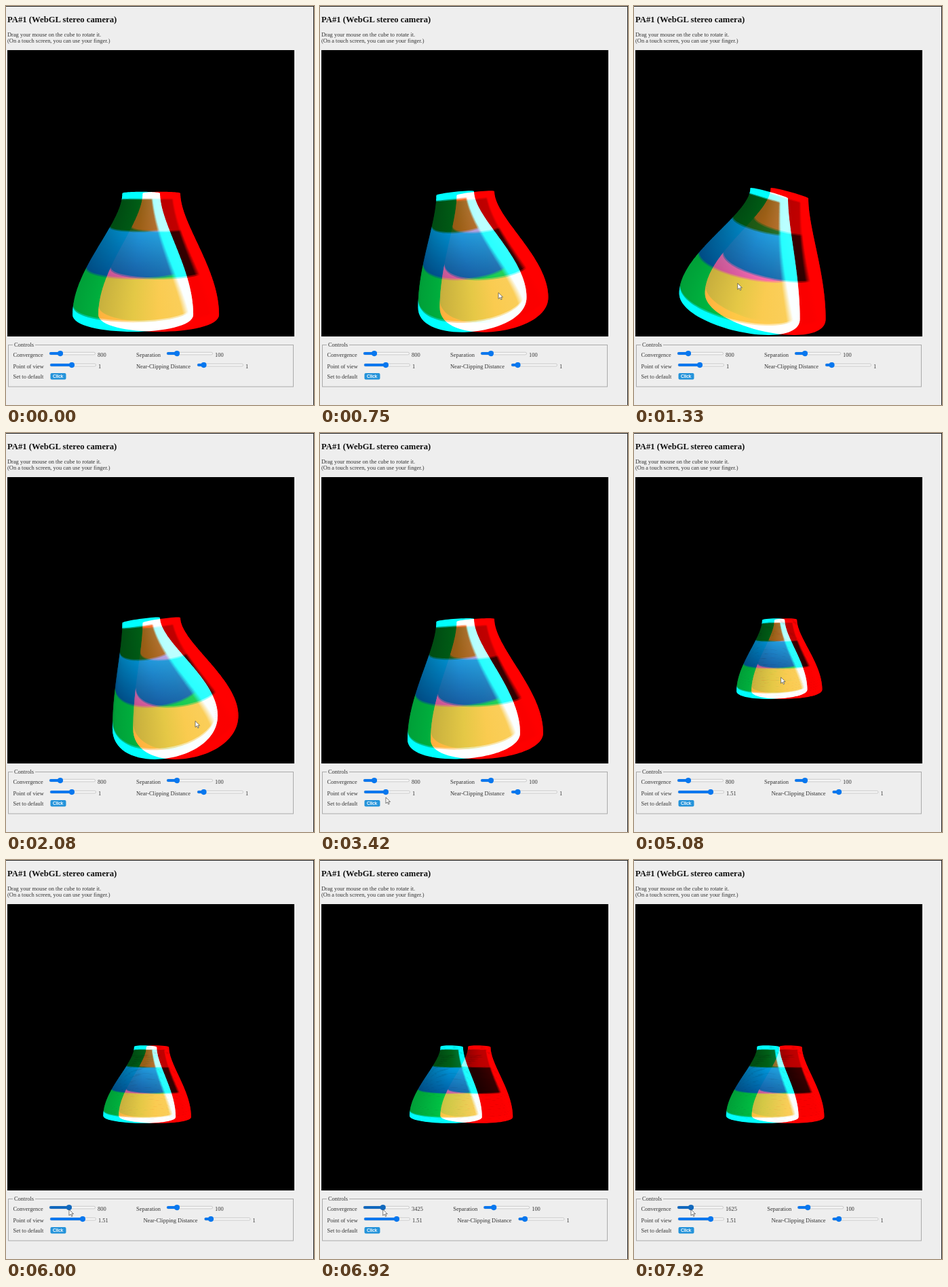
Animation of 454 by 588 pixels, one loop 8 s. Source, as an HTML page with a canvas:

```html
<!DOCTYPE html>
<html lang="en">
<head>
<meta charset="utf-8">
<title>Stereo camera</title>
<style>
  html, body { margin: 0; width: 454px; height: 588px; overflow: hidden; background: #eee; }
  canvas { position: absolute; left: 2px; top: 65px; }
  svg { position: absolute; left: 0; top: 0; }
  text { font: 8.43px "Liberation Serif", "Times New Roman", serif; fill: #333; }
  .title { font-size: 12.7px; font-weight: bold; fill: #111; }
  .button { font: 7px "Liberation Sans", Arial, sans-serif; fill: #fff; stroke: #fff; stroke-width: .2; }
</style>
</head>
<body>
<canvas id="view" width="423" height="422"></canvas>
<svg width="454" height="588">
  <path d="M0 .5H454M453.5 0V588" stroke="#222"/>
  <text class="title" x="2" y="23.5">PA#1 (WebGL stereo camera)</text>
  <text x="2" y="45">Drag your mouse on the cube to rotate it.</text>
  <text x="2" y="54">(On a touch screen, you can use your finger.)</text>
  <rect x="3.5" y="499.5" width="420" height="61.5" fill="none" stroke="#aaa"/>
  <rect x="10" y="496" width="33" height="8" fill="#eee"/>
  <text x="12" y="502">Controls</text>
  <g id="controls"></g>
  <text x="10.5" y="548.5">Set to default</text>
  <rect x="65.5" y="541" width="23" height="9.5" rx="2" fill="#2493da"/>
  <text class="button" x="69" y="548.3">Click</text>
  <path id="cursor" d="M0 0V9L2.2 7L3.8 10.3L5.2 9.6L3.7 6.5H6.6Z" fill="#fff" stroke="#444" stroke-width=".7"/>
</svg>
<script>
const LOOP = 8000, STRIPS = 100;
const lerp = (a, b, k) => a + (b - a) * k;
const mix = (a, b, k) => a.map((v, i) => lerp(v, b[i], k));
const ramp = (t, from, to) => Math.max(0, Math.min(1, (t - from) / (to - from)));

// Interpolates [key, array] pairs, holding the ends.
function track(keys, at) {
  let i = 0;
  while (i < keys.length - 2 && at >= keys[i + 1][0]) i++;
  return mix(keys[i][1], keys[i + 1][1], ramp(at, keys[i][0], keys[i + 1][0]));
}

// How far the surface is dragged to the left (-) or right (+).
const drag = [
  [0, [0]], [500, [1.5]], [880, [1.5]], [1330, [-1.25]], [1480, [-2.3]],
  [2080, [1.9]], [2350, [1.9]], [2550, [1]], [4600, [1]], [5400, [-.1]]
];
const white = [255, 255, 255], amber = [185, 95, 22], blue = [38, 150, 218], yellow = [250, 200, 70];
const bands = [
  [.05, white], [.07, amber], [.31, amber], [.33, blue],
  [.64, [25, 95, 165]], [.66, yellow], [.92, yellow], [.94, white]
];

const ctx = view.getContext('2d');
const layer = document.createElement('canvas');
layer.width = view.width;
layer.height = view.height;
const pen = layer.getContext('2d');
pen.translate(-2, -65);

// Corners of the flared surface for one eye (0 left, 1 right), with the sag of its lower rim.
function outline({ lean, lift, size, shift }, eye) {
  const toRight = Math.max(0, lean);
  const tilt = lean * (lean < 0 ? -30 : -10);
  const middle = 187 + 25 * lean, half = 89 - 6 * toRight;
  const floor = 480 - lift, level = 455 - 8 * lean * lean - lift / 2;
  const topOffset = eye * 30, bottomOffset = eye * (38 - 4 * toRight);
  const place = (x, y) => [lerp(215, x, size) + (eye * 2 - 1) * shift, lerp(275, y, size)];
  return {
    topLeft: place(171.5 + topOffset, 276 - .2 * tilt),
    topRight: place(227 + topOffset, 276 + .2 * tilt),
    bottomLeft: place(middle - half + bottomOffset, level - tilt / 2),
    bottomRight: place(middle + half + bottomOffset, level + tilt / 2),
    sag: (floor - level) / .75 * size
  };
}

// Point on a flared side that leaves the top and meets the rim vertically.
function side([x0, y0], [x1, y1], v) {
  const w = 1 - v, h = y1 - y0;
  const bezier = (a, b, c, d) => w*w*w*a + 3*w*w*v*b + 3*w*v*v*c + v*v*v*d;
  return [bezier(x0, x0, x1, x1), bezier(y0, y0 + .25 * h, y1 - .38 * h, y1)];
}

function drawEye(pose, eye, mask) {
  const { topLeft, topRight, bottomLeft, bottomRight, sag } = outline(pose, eye);
  const ring = v => ({
    l: side(topLeft, bottomLeft, v),
    r: side(topRight, bottomRight, v),
    s: lerp(-3, sag, v)
  });
  const tint = c => `rgb(${c.map((x, i) => Math.round(x * mask[i]))})`;
  pen.clearRect(0, 0, 454, 588);
  for (let i = 0; i < STRIPS; i++) {
    const v = i / STRIPS, a = ring(v), b = ring(Math.min(1, (i + 1.6) / STRIPS));
    const color = track(bands, v), seam = lerp(.75, .93, v);
    const shade = pen.createLinearGradient(...a.l, ...a.r);
    shade.addColorStop(0, tint(color.map(x => x < 255 ? x * .8 : x)));
    shade.addColorStop(.5, tint(color));
    shade.addColorStop(seam, tint(mix(color, white, .1)));
    shade.addColorStop(seam + .05, tint(white));
    pen.fillStyle = shade;
    pen.beginPath();
    pen.moveTo(...a.l);
    pen.bezierCurveTo(a.l[0], a.l[1] + a.s, a.r[0], a.r[1] + a.s, ...a.r);
    pen.lineTo(...b.r);
    pen.bezierCurveTo(b.r[0], b.r[1] + b.s, b.l[0], b.l[1] + b.s, ...b.l);
    pen.fill();
  }
  ctx.drawImage(layer, 0, 0);
}

function makeSlider(label, x, y, trackX) {
  const group = document.createElementNS('http://www.w3.org/2000/svg', 'g');
  group.innerHTML = `<text x="${x}" y="${y}">${label}</text>
    <rect x="${trackX}" y="${y - 6.2}" width="67.5" height="3.6" rx="1.8" fill="#f5f5f5" stroke="#bbb" stroke-width=".7"/>
    <rect class="fill" x="${trackX}" y="${y - 6.4}" height="4" rx="2"/>
    <circle r="4.1" cy="${y - 4.4}"/>
    <text class="value" x="${trackX + 71}" y="${y}"></text>`;
  controls.append(group);
  const fill = group.querySelector('.fill'), thumb = group.querySelector('circle');
  const output = group.querySelector('.value');
  return (position, value, shift = 0, color = '#0877ee') => {
    group.setAttribute('transform', `translate(${shift})`);
    group.setAttribute('fill', color);
    fill.setAttribute('width', position);
    thumb.setAttribute('cx', trackX + position);
    output.textContent = value;
  };
}

const setConvergence = makeSlider('Convergence', 10.5, 516.5, 64);
const setSeparation = makeSlider('Separation', 192, 516.5, 237);
const setPointOfView = makeSlider('Point of view', 10.5, 533.5, 65);
const setNear = makeSlider('Near-Clipping Distance', 192, 533.5, 282);

// The pointer drags the surface, visits the view slider, drags again, then takes the convergence slider.
function pointerAt(t, lean, zoom, thumb) {
  const onSurface = [203 + 40 * lean, t < 3000 ? 415 + 5 * lean : 360];
  const onView = [lerp(97, 126, zoom), lerp(537, 526, ramp(t, 3420, 3600))];
  const onConvergence = [64 + thumb, 515];
  const first = mix(onSurface, onView, ramp(t, 2550, 3300));
  const second = mix(onSurface, onConvergence, ramp(t, 5400, 5900));
  return mix(first, second, ramp(t, 4350, 4700));
}

function render(t) {
  const dragged = t >= 5900;
  const target = lerp(3475, 1625, ramp(t, 6900, 7800));
  const convergence = t < 6080 ? 800 : Math.round(target / 25) * 25;
  const thumb = 16 + (dragged ? (target - 800) * 4 / 825 : 0);
  setConvergence(thumb, convergence, 0, dragged ? '#1168bd' : undefined);
  setSeparation(15, 100, convergence > 999 ? 4.2 : 0);

  const zoom = ramp(t, 3550, 4200);
  const pointOfView = +(1 + .51 * zoom).toFixed(2);
  setPointOfView(lerp(32, 48, zoom), pointOfView);
  setNear(9.5, 1, pointOfView > 1 ? 10.5 : 0);

  const [lean] = track(drag, t);
  const pose = {
    lean,
    lift: 17 * ramp(t, 4600, 5400),
    size: lerp(1, .6, zoom),
    shift: 11800 * (1 / 800 - 1 / convergence)
  };
  ctx.globalCompositeOperation = 'source-over';
  ctx.fillStyle = '#000';
  ctx.fillRect(0, 0, view.width, view.height);
  ctx.globalCompositeOperation = 'lighter';
  drawEye(pose, 0, [0, 1, 1]);
  drawEye(pose, 1, [1, 0, 0]);

  cursor.setAttribute('transform', `translate(${pointerAt(t, lean, zoom, thumb)})`);
  cursor.setAttribute('visibility', t < 80 ? 'hidden' : 'visible');
}

const start = performance.now();
function frame() {
  render((performance.now() - start) % LOOP);
  requestAnimationFrame(frame);
}
frame();
</script>
</body>
</html>
```
